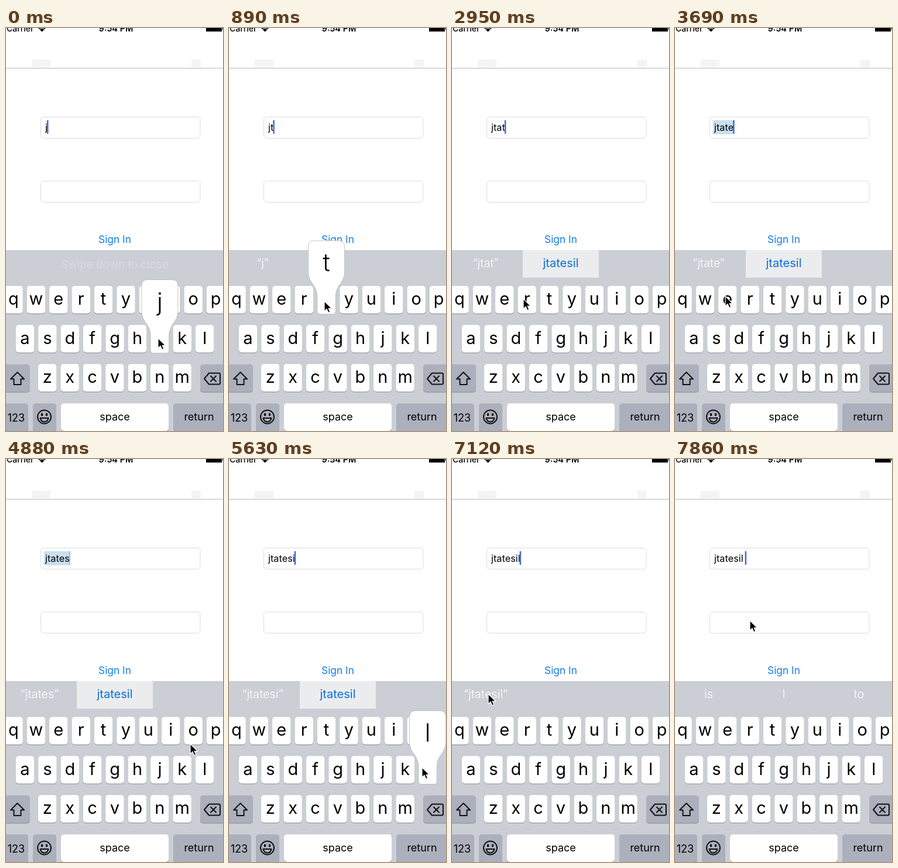
Animation of 371 by 686 pixels, one loop 8 s. Source, as an HTML page:

```html
<!DOCTYPE html>
<html lang="en">
<head>
<meta charset="utf-8">
<title>Sign in keyboard</title>
<style>
html, body { margin: 0; width: 100%; height: 100%; overflow: hidden; background: #fff; }
svg { display: block; width: 371px; height: 686px; font-family: Inter, Roboto, sans-serif; }
.mid { text-anchor: middle; }
.key { font-size: 29px; }
.word { font-size: 18px; }
.hint { font-size: 20px; font-weight: 300; fill: #fff; }
.hint.on { font-weight: 400; fill: #0b6fdc; }
.line { fill: none; stroke: #111; stroke-width: 2; stroke-linejoin: round; stroke-linecap: round; }
</style>
</head>
<body>
<svg viewBox="0 0 371 686">
  <g font-size="14" font-weight="500">
    <text x="1" y="6">Carrier</text>
    <text x="188" y="6" class="mid" font-weight="600" font-size="14.5">9:54 PM</text>
  </g>
  <path d="M55 0H68L61.500 6.500Z"/>
  <path d="M57.500 1.800Q61.500 -.5 65.500 1.800" fill="none" stroke="#fff"/>
  <path d="M342 0H369V6H342ZM370 0h1v3h-1z"/>
  <path d="M44 54h32v13H44zM317 54h16v13h-16z" fill="#f4f4f4"/>
  <path d="M0 68.500H371" stroke="#b9b9b9"/>
  <g fill="#fff" stroke="#dcdcdc">
    <rect x="59.500" y="151.500" width="272.500" height="36" rx="5"/>
    <rect x="59.500" y="260.500" width="272.500" height="36" rx="5"/>
  </g>
  <rect id="sel" x="65" y="157" height="24" fill="#c9dff0"/>
  <text id="typed" x="67" y="175" font-size="16.300"></text>
  <rect id="caret" y="157" width="2.500" height="23" fill="#4169e8"/>
  <text x="186" y="366" class="mid" font-size="17.300" fill="#127ce6">Sign In</text>

  <rect y="378" width="371" height="308" fill="#cbced4"/>
  <rect id="cell" y="378" width="130" height="47" fill="#ebecee"/>
  <text id="swipe" x="186" y="409" class="mid" font-size="19" font-weight="300" fill="#dcdee2">Swipe down to close</text>
  <text id="left" x="57.500" y="407" class="mid hint"></text>
  <text id="centre" x="186" y="407" class="mid hint"></text>
  <text id="right" x="314.500" y="407" class="mid hint"></text>

  <g id="keys"></g>
  <g class="line">
    <path d="M19.500 586L31 597.500H25.500V607H13.500V597.500H8Z"/>
    <path d="M347 587.500H364Q366 587.500 366 589.500V604.500Q366 606.500 364 606.500H347L339 597ZM350 592.500L359 601.500M359 592.500L350 601.500"/>
    <circle cx="65.500" cy="662" r="11.500"/>
    <path d="M58.500 664H72.500Q71 670.500 65.500 670.500T58.500 664Z"/>
  </g>
  <ellipse cx="61.500" cy="658" rx="1.700" ry="2.500"/>
  <ellipse cx="69.500" cy="658" rx="1.700" ry="2.500"/>

  <g id="popup">
    <path d="M-21 -77H21Q31 -77 31 -67V-24C31 -4 15.750 -2 15.750 18V43Q15.750 48 10.750 48H-10.750Q-15.750 48 -15.750 43V18C-15.750 -2 -31 -4 -31 -24V-67Q-31 -77 -21 -77Z" fill="#fff" stroke="#b4b7bc" stroke-width=".8"/>
    <text id="big" y="-25" class="mid" font-size="42" font-weight="300"></text>
  </g>
  <path id="pointer" d="M0 0V17L4 13.300L6.800 19.600L9.800 18.400L7.200 12.300H12.500Z" stroke="#fff" stroke-width="1.200"/>
</svg>
<script>
const $ = id => document.getElementById(id);
const STEPS = 54, LOOP = 8000, NAME = 'jtatesil';
const presses = [0, 6, 12, 16, 23, 28, 36, 39];   // step at which each letter lands
const path = [                                    // step, x, y of the pointer tip
  [0, 260, 528], [1, 260, 528], [5, 163, 465], [7, 163, 465], [11, 27, 521], [13, 27, 521],
  [15, 163, 465], [16, 160, 466], [17, 122, 478], [18, 122, 478], [19, 122, 461], [20, 122, 461],
  [22, 86, 458], [25, 86, 456], [27, 66, 521], [29, 66, 521], [33, 315, 485],
  [35, 278, 466], [36, 278, 466], [38, 330, 525], [39, 330, 525], [42, 238, 493],
  [48, 62, 400], [51, 62, 400], [53, 128, 275]
];

// Keyboard
const spots = {};
let html = '';
function key(x, y, w, label, cls, fill = '#fff', dy = 32) {
  html += `<rect x="${x}" y="${y + 1}" width="${w}" height="47" rx="5" fill="#898c91"/>` +
    `<rect x="${x}" y="${y}" width="${w}" height="47" rx="5" fill="${fill}"/>` +
    `<text x="${x + w / 2}" y="${y + dy}" class="mid ${cls}">${label}</text>`;
}
[['qwertyuiop', 13, 439], ['asdfghjkl', 32.5, 505.5], ['zxcvbnm', 70.7, 572]].forEach(([row, x0, y]) =>
  [...row].forEach((c, i) => {
    const x = x0 + 38.4 * i;
    spots[c] = [x, y];
    key(x - 15.75, y, 31.5, c, 'key');
  }));
const GREY = '#abb0bc';
key(-6, 572.5, 47, '', 'word', GREY);
key(332, 572.5, 47, '', 'word', GREY);
key(-3, 639, 41, '123', 'word', GREY, 31);
key(46, 639, 40, '', 'word', GREY);
key(94, 639, 184, 'space', 'word', '#fff', 29);
key(286, 639, 88, 'return', 'word', GREY, 29);
$('keys').innerHTML = html;

const show = (id, on) => $(id).setAttribute('visibility', on ? 'visible' : 'hidden');
const count = n => presses.filter(p => p <= n).length;

function pointerAt(n) {
  const i = Math.max(1, path.findIndex(p => p[0] >= n));
  const [a, ax, ay] = path[i - 1], [b, bx, by] = path[i];
  const k = (n - a) / (b - a), e = k * k * (3 - 2 * k);
  return [ax + (bx - ax) * e, ay + (by - ay) * e];
}

function hints(n) {
  if (n > 50) return ['is', 'I', 'to'];
  if (n < 3) return ['', '', ''];
  return [`“${NAME.slice(0, count(n - 1))}”`, n > 7 && n < 40 ? NAME : '', ''];
}

function draw(n) {
  const len = count(n), done = n > 50;
  $('typed').textContent = NAME.slice(0, len);
  const end = 67 + $('typed').getComputedTextLength() + (done ? 4 : 0);
  const last = done ? 51 : presses[len - 1];
  const beat = (n - last) % 7;
  $('caret').setAttribute('x', end - 1);
  $('caret').setAttribute('opacity', beat < 5 ? 1 : beat === 5 ? .25 : 0);
  $('sel').setAttribute('width', end - 64);
  show('sel', n >= 24 && n < 36);

  const offer = n >= 19 && n < 40, tapped = n === 50;
  show('cell', offer || tapped);
  $('cell').setAttribute('x', offer ? 121 : -9);
  $('centre').classList.toggle('on', offer);
  $('left').classList.toggle('on', tapped);
  ['left', 'centre', 'right'].forEach((id, i) => $(id).textContent = hints(n)[i]);
  $('swipe').setAttribute('opacity', Math.max(0, 1 - n / 3));

  const pressed = presses.findIndex(p => n === p || n === p - 1);
  show('popup', pressed >= 0);
  if (pressed >= 0) {
    const c = NAME[pressed];
    $('big').textContent = c;
    $('popup').setAttribute('transform', `translate(${spots[c]})`);
  }
  $('pointer').setAttribute('transform', `translate(${pointerAt(n)})`);
}

function tick() {
  const t = performance.now() % LOOP;
  draw(Math.min(STEPS - 1, Math.floor((t + 8) / LOOP * STEPS)));
  requestAnimationFrame(tick);
}
tick();
</script>
</body>
</html>
```
